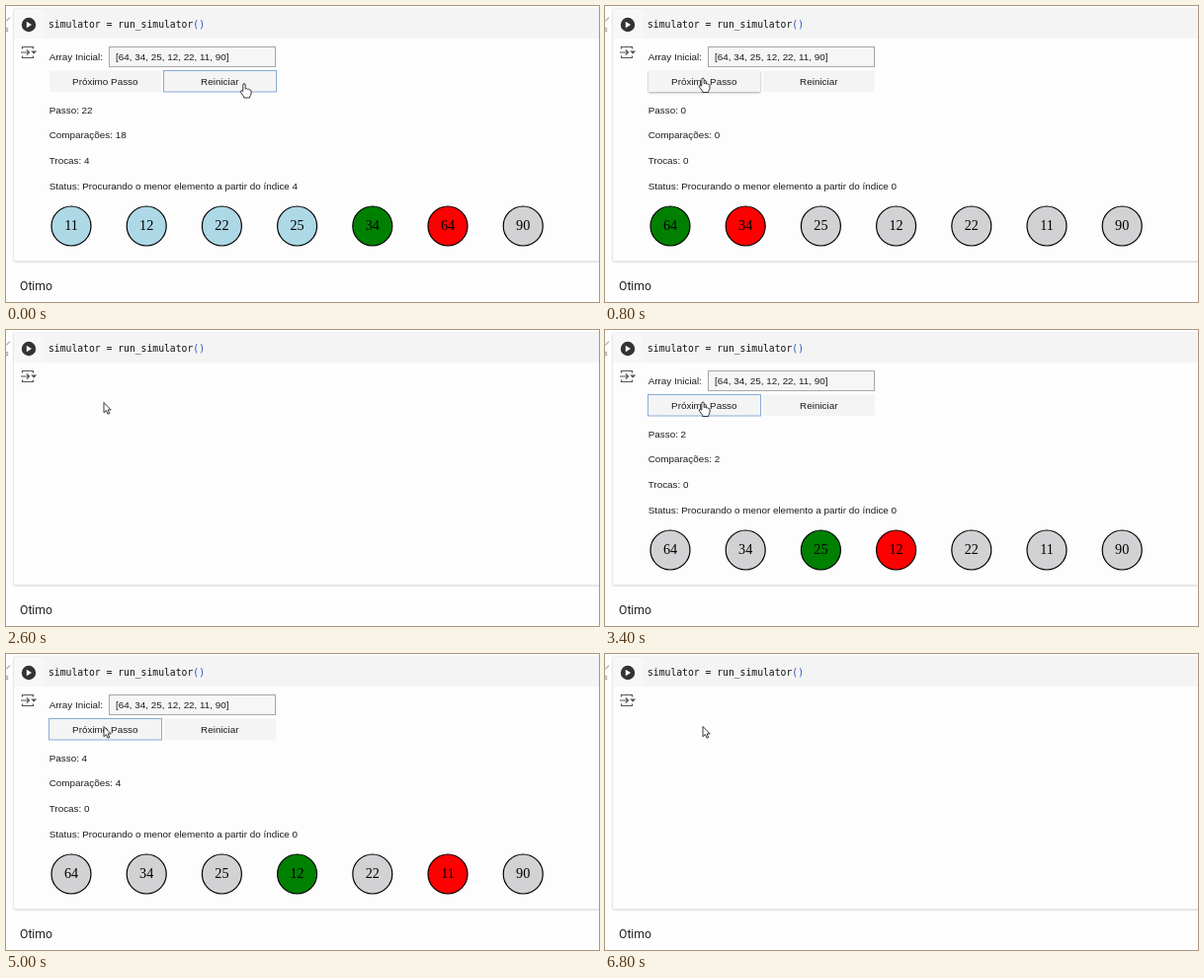
Write an HTML page that moves like this. It is 600 by 300 pixels and loops after 8000 ms.

```html
<!DOCTYPE html>
<html lang="pt">
<head>
<meta charset="utf-8">
<title>Simulador de ordenação</title>
<style>
  html, body { margin: 0; width: 100%; height: 100%; overflow: hidden; background: #fefefe; }
  svg { display: block; width: 600px; height: 300px; }
  text { white-space: pre; }
  .ui { font: 9.9px "Liberation Sans", Arial, sans-serif; fill: #1c1c1c; }
  .code { font: 9.72px "DejaVu Sans Mono", monospace; fill: #111; }
  .note { font: 12.2px Roboto, sans-serif; fill: #212121; }
  .num { font: 14.2px "Liberation Serif", Times, serif; fill: #000; text-anchor: middle; }
  .mid { text-anchor: middle; }
  .button rect { fill: #f4f4f4; }
  .button .shade, .button .ring { visibility: hidden; }
  .button.hover .shade, .button.focus .ring { visibility: visible; }
  .button .ring { fill: none; stroke: #86add9; }
  .ball circle { stroke: #000; stroke-width: 1.2; }
  .cursor { fill: #fff; stroke: #222; stroke-width: .9; stroke-linejoin: round; }
</style>
</head>
<body>
<svg viewBox="0 0 600 300">
  <defs>
    <filter id="blur" x="-10%" y="-40%" width="120%" height="180%"><feGaussianBlur stdDeviation="1"/></filter>
    <path id="hand" d="M-1.2 7.5V1Q-1.2 -.4 0 -.4T1.2 1V5Q2.5 4.2 3.4 5.4Q4.7 4.8 5.4 6Q6.9 5.6 7 7.2V10Q6.7 11.7 5.7 12.8V14H-.3V12.8L-3.6 8.4Q-4 7 -2.8 6.8Z"/>
    <path id="arrow" d="M0 0V10.2L2.4 8L4 11.7L5.7 11L4.1 7.4H7.2Z"/>
  </defs>

  <!-- notebook cell -->
  <rect x="8" y="3.5" width="620" height="255.5" fill="#bbb" filter="url(#blur)"/>
  <rect x="8" y="3" width="620" height="255.5" fill="#fefdfe"/>
  <rect x="8" y="3" width="30" height="30" fill="#f7f7f7"/>
  <rect x="38" y="3" width="562" height="30" fill="#f4f4f4"/>
  <path d="M0 15.5L4 11.5" stroke="#777" fill="none"/>
  <text x="-1" y="26" font-family="Roboto, sans-serif" font-size="7" fill="#777">s</text>
  <circle cx="23" cy="19" r="7.2" fill="#333"/>
  <path d="M20.8 15.7V22.3L26 19Z" fill="#fff"/>
  <text class="code" x="43" y="22">simulator = run_simulator<tspan fill="#2456c4">()</tspan></text>
  <g fill="none" stroke="#555" stroke-width="1.2">
    <path d="M16.5 43.5V41.5H27.5V43.5M16.5 50.5V52.5H27.5V50.5M15 47H23.5M21 44.5L23.5 47L21 49.5"/>
    <path d="M25.2 45.5H31.2L28.2 48.7Z" fill="#555" stroke="none"/>
  </g>
  <text class="note" x="14" y="288">Otimo</text>

  <g id="output">
    <text class="ui" x="43.7" y="55">Array Inicial:</text>
    <rect x="104.5" y="41.5" width="168" height="20" fill="#f6f6f6" stroke="#a6a6a6"/>
    <text class="ui" x="111" y="55">[64, 34, 25, 12, 22, 11, 90]</text>
    <g id="buttons"></g>
    <g id="lines"></g>
    <g id="balls"></g>
  </g>
  <use id="cursor" class="cursor"/>
</svg>

<script>
const LOOP = 8000;
const START = [64, 34, 25, 12, 22, 11, 90];
const SORTED = [11, 12, 22, 25, 34, 64, 90];
const GRAY = '#d2d1d3';
const $ = id => document.getElementById(id);

function add(parent, tag, attrs, text = '') {
  const el = document.createElementNS('http://www.w3.org/2000/svg', tag);
  for (const key in attrs) el.setAttribute(key, attrs[key]);
  el.textContent = text;
  return parent.appendChild(el);
}

function makeButton(x, label) {
  const g = add($('buttons'), 'g', { class: 'button' });
  add(g, 'rect', { class: 'shade', x, y: 67, width: 113, height: 20.8, style: 'fill:#999', filter: 'url(#blur)' });
  add(g, 'rect', { x, y: 65.5, width: 113, height: 21.5 });
  add(g, 'rect', { class: 'ring', x: x - .5, y: 65.5, width: 114, height: 21.5 });
  add(g, 'text', { class: 'ui mid', x: x + 56.3, y: 79.5 }, label);
  return g;
}

const buttons = { next: makeButton(44, 'Próximo Passo'), reset: makeButton(160, 'Reiniciar') };
const lines = [108.5, 134.2, 160.2, 186].map(y => add($('lines'), 'text', { class: 'ui', x: 43.7, y }));
const balls = START.map((_, i) => {
  const g = add($('balls'), 'g', { class: 'ball' }), x = 66 + 76.2 * i;
  return {
    disc: add(g, 'circle', { cx: x, cy: 223, r: 20 }),
    num: add(g, 'text', { class: 'num', x, y: 227.4 })
  };
});

// First pass of selection sort: track the smallest value seen before each step.
function firstPass(step) {
  let min = 0;
  for (let j = 1; j <= step; j++) if (START[j] < START[min]) min = j;
  return { values: START, step, compares: step, swaps: 0, from: 0, min, probe: step + 1, done: 0 };
}
const LATE = { values: SORTED, step: 22, compares: 18, swaps: 4, from: 4, min: 4, probe: 5, done: 4 };

// time, view (null = cleared output), button states, cursor shape and tip
const scenes = [
  [0, LATE, { reset: 'focus' }, 'hand', 241, 79],
  [200, null, {}, 'arrow', 241, 79],
  [400, firstPass(0), {}, 'arrow', 241, 79],
  [600, firstPass(0), { reset: 'hover' }, 'hand', 226, 83],
  [800, firstPass(0), { next: 'hover' }, 'hand', 99, 73.5],
  [1600, firstPass(0), { next: 'focus' }, 'hand', 99, 73.5],
  [2000, firstPass(0), { next: 'focus' }, 'hand', 98, 75, .7],
  [2600, null, {}, 'arrow', 99, 73.5],
  [3400, firstPass(2), { next: 'focus' }, 'hand', 99, 73.5],
  [3800, firstPass(3), {}, 'arrow', 99, 73.5],
  [4000, firstPass(3), { next: 'focus' }, 'arrow', 99, 73.5],
  [4600, firstPass(4), {}, 'arrow', 99, 73.5],
  [4800, firstPass(4), { next: 'focus' }, 'arrow', 99, 73.5],
  [5600, firstPass(5), {}, 'arrow', 99, 73.5],
  [5800, firstPass(5), { next: 'focus' }, 'arrow', 99, 73.5],
  [6800, null, {}, 'arrow', 99, 73.5]
];

function show([, view, states, shape, x, y, scale = 1]) {
  $('output').style.display = view ? '' : 'none';
  $('cursor').setAttribute('href', '#' + shape);
  $('cursor').setAttribute('transform', `translate(${x} ${y}) scale(${scale})`);
  for (const key in buttons) buttons[key].setAttribute('class', 'button ' + (states[key] || ''));
  if (!view) return;
  [`Passo: ${view.step}`, `Comparações: ${view.compares}`, `Trocas: ${view.swaps}`,
   `Status: Procurando o menor elemento a partir do índice ${view.from}`]
    .forEach((text, i) => lines[i].textContent = text);
  balls.forEach(({ disc, num }, i) => {
    num.textContent = view.values[i];
    disc.setAttribute('fill', i === view.min ? '#008000' : i === view.probe ? '#ff0000'
      : i < view.done ? '#add8e6' : GRAY);
  });
}

let current;
const origin = performance.now();
function tick() {
  const t = Math.max(0, performance.now() - origin) % LOOP;
  const scene = scenes.findLast(s => s[0] <= t);
  if (scene !== current) show(current = scene);
  requestAnimationFrame(tick);
}
tick();
</script>
</body>
</html>
```
